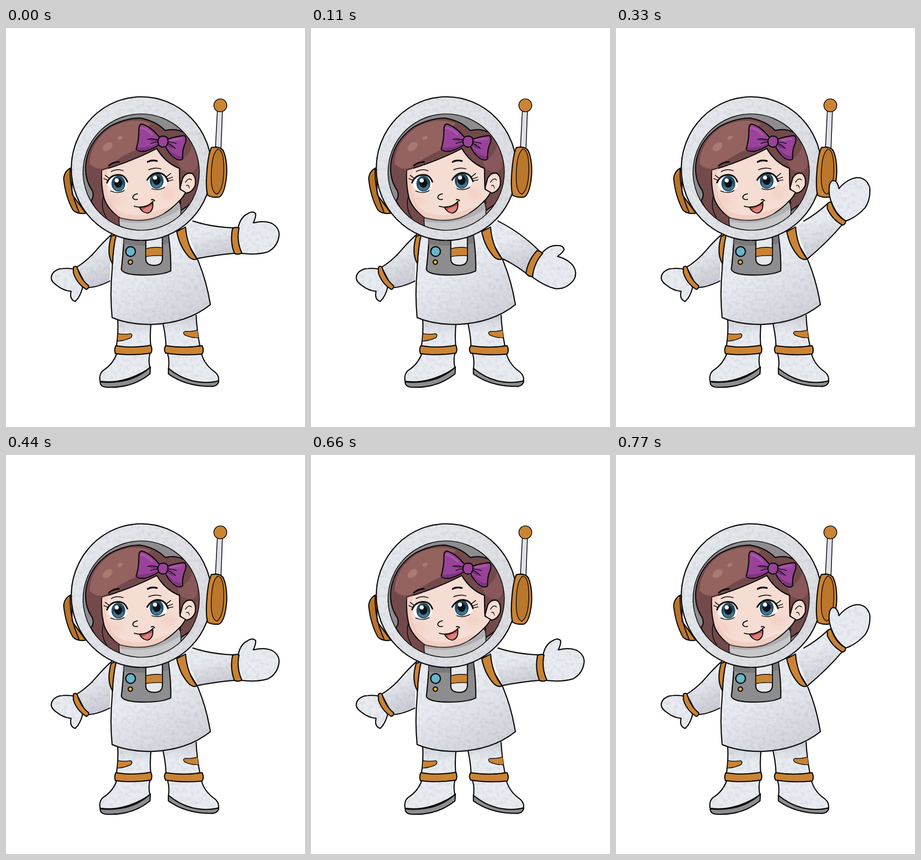
These frames come from a looping animation (648 px wide and 864 px high, 0.88 s). An HTML page:

```html
<!DOCTYPE html>
<html lang="en">
<head>
<meta charset="utf-8">
<title>Waving astronaut</title>
<style>
  html, body { margin: 0; width: 100%; height: 100%; overflow: hidden; background: #fff; }
  svg { display: block; width: 100vw; height: 100vh; }
  .ink { stroke: #0c0909; stroke-width: 2.5; stroke-linecap: round; stroke-linejoin: round; fill: none; }
  .thin { stroke-width: 1.7; }
  .white { fill: #e8ecf1; }
  .orange { fill: #ca8433; }
  .gray { fill: #8d8d8f; }
  .hair { fill: #734a4b; }
  .skin { fill: #f5ddd3; }
  .purple { fill: #984399; }
  .plum { fill: #743178; }
  .suit { filter: url(#suit); }
  .pencil { filter: url(#pencil); }
</style>
</head>
<body>
<svg viewBox="0 0 648 864">
  <defs>
    <!-- Rough pencil edge -->
    <filter id="pencil" filterUnits="userSpaceOnUse" x="0" y="0" width="648" height="864" color-interpolation-filters="sRGB">
      <feTurbulence type="fractalNoise" baseFrequency=".2" numOctaves="2" seed="4" result="rough"/>
      <feDisplacementMap in="SourceGraphic" in2="rough" scale="1.6" xChannelSelector="R" yChannelSelector="G"/>
    </filter>
    <!-- Rough edge plus faint gray grain -->
    <filter id="suit" filterUnits="userSpaceOnUse" x="0" y="0" width="648" height="864" color-interpolation-filters="sRGB">
      <feTurbulence type="fractalNoise" baseFrequency=".12" numOctaves="4" seed="8"/>
      <feColorMatrix values="0 0 0 0 .74  0 0 0 0 .74  0 0 0 0 .78  .6 0 0 0 -.26"/>
      <feComposite in2="SourceAlpha" operator="in" result="grain"/>
      <feBlend in="grain" in2="SourceGraphic" mode="multiply" result="paper"/>
      <feTurbulence type="fractalNoise" baseFrequency=".2" numOctaves="2" seed="4" result="rough"/>
      <feDisplacementMap in="paper" in2="rough" scale="1.6" xChannelSelector="R" yChannelSelector="G"/>
    </filter>
    <filter id="soft" x="-50%" y="-50%" width="200%" height="200%"><feGaussianBlur stdDeviation="8"/></filter>
    <linearGradient id="dress" x1=".2" y1="0" x2=".75" y2="1">
      <stop offset=".4" stop-color="#e8ecf1"/><stop offset="1" stop-color="#d0d1d8"/>
    </linearGradient>
    <linearGradient id="leg" x1="0" y1="0" x2="0" y2="1">
      <stop offset="0" stop-color="#cfd0d9"/><stop offset=".55" stop-color="#e8ecf1"/>
    </linearGradient>
    <linearGradient id="sleeve" x1="0" y1="0" x2=".3" y2="1">
      <stop offset=".4" stop-color="#e8ecf1"/><stop offset="1" stop-color="#cccdd6"/>
    </linearGradient>
    <linearGradient id="shell" x1="0" y1="0" x2="1" y2=".6">
      <stop offset="0" stop-color="#e6eaee"/><stop offset="1" stop-color="#dcdde2"/>
    </linearGradient>
    <clipPath id="visor"><ellipse cx="293" cy="312" rx="126" ry="126"/></clipPath>
    <clipPath id="face"><path d="M208 308Q270 290 327 261Q345 292 376 304L377 376Q350 401 322 411Q290 421 248 411Q207 386 208 308Z"/></clipPath>
    <g id="hand">
      <path class="ink white" d="M503 434Q507 410 524 402Q535 395 541 402Q542 409 536 422Q559 416 576 423Q592 432 592 448Q589 474 567 485Q542 492 510 488Q496 465 503 434Z"/>
      <path class="ink orange" d="M491 434Q498 430 505 433Q499 461 511 487Q504 492 495 488Q485 462 491 434Z"/>
    </g>
  </defs>

  <!-- Legs and left arm -->
  <g class="suit">
    <path class="ink" style="fill:url(#leg)" d="M242 632Q244 658 239 692L314 692Q311 665 315 632"/>
    <path class="ink" style="fill:url(#leg)" d="M338 632Q346 660 347 692L421 692Q414 660 412 622"/>
    <path class="ink white" d="M240 705Q232 728 210 742Q201 750 204 765Q258 772 312 736Q308 720 312 704Z"/>
    <path class="ink white" d="M350 704Q355 720 352 738Q400 777 460 766Q464 752 449 742Q430 728 423 704Z"/>
    <path class="ink" style="fill:url(#sleeve)" d="M229 447Q211 463 195 482Q176 504 153 518L176 562Q197 562 225 548"/>
    <path class="ink white" d="M147 522Q131 519 115 522Q98 528 98 542Q99 550 111 558Q125 569 141 570Q137 588 150 592Q161 582 166 562Z"/>
  </g>
  <g class="pencil">
    <path class="ink gray" d="M204 766Q204 779 224 778Q275 779 312 749L313 734Q286 759 249 765Q224 769 204 766Z"/>
    <path class="ink gray" d="M352 737L352 749Q391 777 447 776Q460 775 461 764Q435 771 404 764Q376 757 352 737Z"/>
    <path class="ink orange" d="M238 688Q275 694 314 687Q318 697 314 704Q272 710 237 705Q234 695 238 688Z"/>
    <path class="ink orange" d="M346 688Q385 694 425 688Q430 698 425 706Q386 710 346 704Q341 696 346 688Z"/>
    <path class="ink thin orange" d="M243 662Q258 664 270 662Q276 665 270 671Q258 677 242 678"/>
    <path class="ink thin orange" d="M415 654Q402 658 387 657Q382 660 388 665Q400 671 417 671"/>
    <path class="ink orange" d="M146 518Q151 514 154 518Q162 545 179 558Q180 564 174 566Q153 553 146 530Z"/>
  </g>

  <!-- Dress and chest panel -->
  <g class="suit">
    <path class="ink" style="fill:url(#dress)" d="M238 447Q231 486 230 523Q225 578 230 627Q264 642 316 642Q393 639 443 599Q434 545 415 501L372 430"/>
  </g>
  <g class="pencil">
    <path class="ink orange" d="M228 451L239 447Q232 475 231 511Q217 488 228 451Z"/>
    <path class="ink gray" d="M256 450Q254 490 250 522Q253 535 300 535Q340 535 357 526Q358 492 352 448"/>
    <path d="M256 450L352 448L353 466Q302 476 254 468Z" fill="#707073" opacity=".65"/>
    <path class="ink" style="fill:#e6e7ea" d="M303 450L303 501Q304 514 321 514Q338 514 339 500L339 450"/>
    <path class="ink thin orange" d="M303 478Q320 473 339 476L339 493Q320 492 303 495Z"/>
    <circle class="ink" style="fill:#68b5ca" cx="270" cy="484" r="10.5"/>
    <circle class="ink" style="fill:#e4b039" cx="269.5" cy="507" r="4.7"/>
  </g>

  <!-- Helmet -->
  <g class="pencil">
    <path class="ink orange" d="M143 302Q127 308 125 326Q129 365 145 394Q155 404 173 401L143 360Z"/>
    <path class="ink" d="M139 306Q137 351 158 398"/>
    <path d="M138 308L126 325Q130 367 147 396L157 398Q137 355 138 308Z" fill="#a96724" opacity=".55"/>
  </g>
  <g class="suit">
    <ellipse class="ink" style="fill:url(#shell)" cx="293.5" cy="304.5" rx="152" ry="155.5"/>
  </g>
  <g class="pencil">
    <g clip-path="url(#visor)">
      <rect class="gray" x="160" y="180" width="270" height="270"/>
      <path class="ink hair" d="M184 374Q192 365 187 352Q170 328 173 294Q179 244 225 213Q259 195 290 195Q325 201 345 222Q378 214 402 239L430 275L430 360L375 398L240 435L205 410Z"/>
      <path d="M181 294Q183 245 230 214Q277 191 314 207Q291 226 282 264Q255 274 221 300Q207 309 190 301Z" fill="#94625f"/>
      <path d="M372 288Q404 277 405 239Q419 260 414 300Q405 322 378 304Z" fill="#88585a"/>
      <ellipse cx="220" cy="257" rx="12" ry="8" fill="#a97a73" transform="rotate(-38 220 257)"/>
      <ellipse cx="247" cy="238" rx="6" ry="4" fill="#a97a73" transform="rotate(-25 247 238)"/>
      <path class="ink thin" d="M211 364Q204 390 218 411M378 348Q375 365 379 380"/>
      <path class="ink thin" style="fill:#c7c7c9" d="M245 411Q318 421 374 376Q380 380 379 405L380 445L246 445Z"/>
      <path d="M247 411Q320 425 375 380L377 392Q322 431 248 419Z" fill="#a9a9ac" opacity=".8"/>
      <path class="ink skin" d="M383 325Q391 311 403 315Q413 322 410 341Q402 360 384 357L377 347Z"/>
      <path class="ink thin" d="M389 334Q396 323 402 329M391 341Q397 339 397 347"/>
      <path class="ink skin" d="M208 308Q270 290 327 261Q345 292 376 304Q376 325 377 349L389 356Q384 367 374 376Q350 401 322 411Q290 421 248 411Q222 395 213 370Q205 340 208 308Z"/>
      <g clip-path="url(#face)">
        <path d="M204 306L222 303Q211 352 231 384Q252 409 300 405L360 386L325 416L240 416Q200 380 204 306Z" fill="#efc8bd" opacity=".7"/>
        <ellipse cx="231" cy="374" rx="18" ry="11" fill="#f1c5b9" opacity=".6" filter="url(#soft)"/>
        <ellipse cx="351" cy="358" rx="17" ry="11" fill="#f1c5b9" opacity=".6" filter="url(#soft)"/>
      </g>
    </g>
    <ellipse class="ink thin" cx="293" cy="312" rx="126" ry="126"/>
  </g>

  <!-- Facial features -->
  <g class="ink">
    <path stroke="none" fill="#fff" d="M220 334Q231 317 249 319Q262 325 263 344Q252 356 237 355Q222 350 220 334Z"/>
    <path stroke="none" fill="#fff" d="M307 328Q321 314 337 317Q349 325 349 339Q339 350 324 350Q310 343 307 328Z"/>
    <g id="iris" stroke="none">
      <ellipse cx="243.5" cy="337" rx="15" ry="17" fill="#274b60"/>
      <ellipse cx="244" cy="343" rx="11" ry="9" fill="#417590"/>
      <ellipse cx="243.5" cy="336" rx="8.5" ry="10" fill="#0b1218"/>
      <circle cx="240" cy="330" r="4.5" fill="#fff"/>
    </g>
    <use href="#iris" x="83" y="-6"/>
    <path stroke-width="3.4" d="M219 335Q225 319 242 318Q257 317 263 333M306 329Q317 312 332 314Q346 316 351 332"/>
    <path class="thin" d="M221 330L212 326M223 325L215 319M350 327L361 323M348 322L357 315M352 331L362 329"/>
    <path class="thin" d="M227 353Q243 360 256 352M316 348Q331 353 344 345M228 311Q240 304 254 309M309 307Q323 301 336 305"/>
    <path stroke-width="3.6" d="M223 298Q232 290 245 290M307 290Q315 285 327 288"/>
    <path stroke-width="2" d="M285 359Q274 361 275 368Q278 373 285 371"/>
    <path fill="#bd4e50" stroke-width="2.2" d="M289 388Q305 388 318 377Q320 398 306 401Q295 399 289 388Z"/>
    <path stroke="none" fill="#dc817c" d="M295 394Q308 386 317 385Q317 396 306 400Q299 399 295 394Z"/>
    <path stroke-width="2.2" d="M278 386Q303 393 319 375M315 372Q319 370 322 374"/>
  </g>

  <!-- Bow -->
  <g class="pencil">
    <path class="ink purple" d="M332 236Q314 214 295 208Q288 208 288 220Q288 245 282 262Q285 268 300 267Q317 263 333 252Z"/>
    <path class="ink purple" d="M349 241Q367 235 385 233Q392 234 389 248Q381 266 383 283Q378 289 366 282Q352 272 345 255Z"/>
    <path class="plum" d="M330 250Q309 260 285 259L283 264Q301 270 331 252ZM347 256Q361 275 381 278L381 284Q365 285 347 256Z" opacity=".75"/>
    <path class="plum" d="M330 243Q318 239 306 241Q318 247 330 246ZM350 250Q360 253 367 261Q356 262 349 254Z"/>
    <path class="ink thin" d="M328 242Q318 239 307 241M329 247Q321 247 314 250M351 250Q360 253 367 261M353 247Q361 247 369 250"/>
    <path class="ink purple" d="M332 237Q340 231 349 237Q354 246 347 256Q337 261 331 253Q327 244 332 237Z"/>
    <path d="M293 216Q305 218 317 230M358 243Q370 240 380 240" fill="none" stroke="#b263b2" stroke-width="5" stroke-linecap="round" opacity=".6"/>
  </g>

  <!-- Antenna and earpiece -->
  <g class="pencil">
    <path class="ink thin" style="fill:#dfe1e6" d="M458 180L454 258L466 260L469 180Z"/>
    <circle class="ink thin orange" cx="464.5" cy="167.5" r="14"/>
    <path class="ink orange" d="M445 259Q464 255 471 266Q480 286 478 320Q474 360 462 366Q447 368 437 362Q432 344 436 303Q439 272 445 259Z"/>
    <path class="ink thin" style="fill:#bb772b" d="M459 262Q472 264 472 304Q472 350 457 360Q443 355 445 314Q446 272 459 262Z"/>
  </g>

  <!-- Waving arm -->
  <g id="level" class="suit">
    <path fill="url(#sleeve)" d="M405 418Q448 432 500 433L495 488Q457 491 416 500L388 431Z"/>
    <path class="ink" d="M405 418Q448 432 500 433M416 499Q457 491 495 488"/>
    <use href="#hand"/>
  </g>
  <g id="low" class="suit">
    <path fill="url(#sleeve)" d="M405 418Q457 444 498 486L466 531Q441 512 416 500L388 431Z"/>
    <path class="ink" d="M405 418Q457 444 498 486M416 500Q441 512 466 531"/>
    <use href="#hand" transform="rotate(30 400 455)"/>
  </g>
  <g id="high" class="suit">
    <path fill="url(#sleeve)" d="M407 418Q433 404 460 379L492 425Q460 462 416 500L388 431Z"/>
    <path class="ink" d="M407 418Q433 404 460 379M416 499Q460 462 491 425"/>
    <path class="ink white" d="M468 380Q459 359 463 339Q467 327 476 332Q482 338 483 348Q499 328 521 324Q543 323 550 346Q552 371 540 389Q521 410 498 418Q478 405 468 380Z"/>
    <path class="ink orange" d="M458 381Q463 375 467 378Q476 406 497 417Q499 424 491 427Q468 414 458 391Z"/>
  </g>
  <path class="ink orange pencil" d="M370 441L389 431Q393 474 414 500Q407 504 397 496Q377 475 370 441Z"/>
</svg>
<script>
  const STEP = 110;
  const WAVE = ['level', 'low', 'level', 'high'];
  const arms = ['level', 'low', 'high'].map(id => document.getElementById(id));

  function draw() {
    const pose = WAVE[Math.floor(performance.now() / STEP) % WAVE.length];
    for (const arm of arms) arm.style.display = arm.id === pose ? '' : 'none';
    requestAnimationFrame(draw);
  }
  draw();
</script>
</body>
</html>
```
